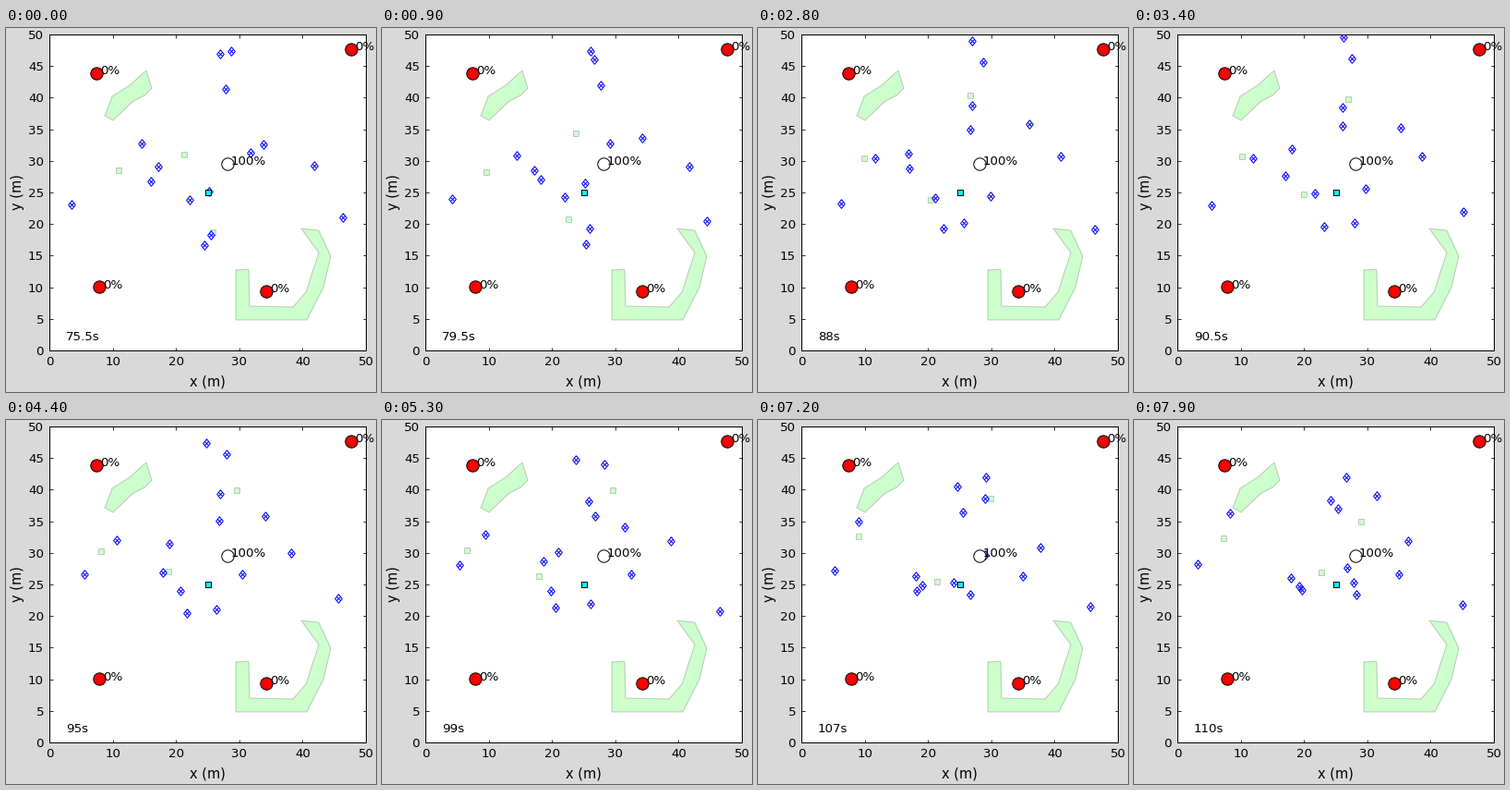
Recreate the animation shown at these times as a matplotlib script. Size 401 by 394 pixels, loop 8 s.

```python
import numpy as np
import matplotlib.pyplot as plt
from matplotlib.animation import FuncAnimation
from matplotlib.lines import Line2D
from matplotlib.patches import Polygon
from matplotlib.path import Path
from matplotlib.transforms import Affine2D

W, H, DPI = 401, 394, 72          # at 72 dpi one point is one pixel
FRAMES, INTERVAL = 80, 100
START, TICK, TICKS = 75.5, 0.5, 69
TEXT, LABEL = 13.33, 14.67

plt.rcParams.update({"font.family": "DejaVu Sans", "font.size": TEXT})
rng = np.random.default_rng(4)


def path(*points):
    """Curve through evenly timed points with a seeded wander, zero at both ends."""
    n = len(points)
    curve = np.polyfit(np.linspace(0, 1, n), points, n - 1)
    waves = np.arange(2, 8)
    sway = rng.normal(0, 3, (len(waves), 2))

    def at(u):
        return u ** np.arange(n)[::-1] @ curve + np.sin(np.pi * waves * u) @ sway

    return at


walkers = [
    path((232, 28), (243, 37), (230, 62)),
    path((244, 25), (219, 24), (213, 87)),
    path((238, 66), (221, 96)),
    path((265, 135), (227, 108), (263, 82)),
    path((279, 126), (285, 105), (231, 160)),
    path((334, 149), (297, 131)),
    path((365, 205), (356, 200)),
    path((220, 177), (287, 167)),
    path((147, 125), (124, 135), (104, 101)),
    path((165, 150), (170, 171)),
    path((157, 166), (173, 136), (238, 176)),
    path((71, 191), (87, 175), (69, 156)),
    path((199, 186), (179, 180)),
    path((222, 224), (241, 189)),
    path((215, 235), (182, 184)),
]
blocks = [
    path((122, 154), (97, 128)),
    path((193, 137), (239, 73), (246, 110)),
    path((224, 221), (178, 172), (203, 165)),
]

fig = plt.figure(figsize=(W / DPI, H / DPI), dpi=DPI, facecolor="#d9d9d9")
ax = fig.add_axes([47 / W, 45 / H, 343 / W, 342 / H])
ax.set(xlim=(0, 50), ylim=(0, 50), xticks=range(0, 51, 10), yticks=range(0, 51, 5))
ax.tick_params(direction="in", top=True, right=True, length=3.5, width=0.8)
ax.tick_params(axis="x", pad=6)
ax.tick_params(axis="y", pad=6)
for spine in ax.spines.values():
    spine.set_linewidth(1)

# Pixel coordinates from the top left corner
px = Affine2D().scale(1, -1).translate(0, H)


def label(x, y, s, **kw):
    return ax.text(x, y, s, transform=px, va="baseline", zorder=8, **kw)


def dots(marker, size, z, xy=((), ()), **kw):
    line = Line2D(*xy, ls="none", marker=marker, ms=size, mew=1,
                  transform=px, zorder=z, **kw)
    ax.add_line(line)
    return line


def zone(*points):
    ax.add_patch(Polygon(points, fc="lime", ec="black", lw=1, alpha=0.2,
                         transform=px, zorder=1))


zone((152, 46), (158, 65), (150, 73), (137, 80), (116, 100), (107, 95),
     (115, 74), (134, 62))
zone((320, 217), (339, 219), (352, 247), (344, 281), (326, 316), (249, 316),
     (249, 262), (263, 261), (264, 301), (311, 302), (325, 286), (339, 243),
     (327, 227))

for x, y, color, share in [(98, 49, "red", 0), (374, 23, "red", 0),
                           (101, 280, "red", 0), (282, 285, "red", 0),
                           (240, 147, "white", 100)]:
    dots("o", 13.33, 5, ([x], [y]), mfc=color, mec="black")
    label(x + 4, y + 1.5, f"{share}%")

dots("s", 6, 6, ([219], [178]), mfc="cyan", mec="black")
label(218, 388, "x (m)", size=LABEL, ha="center")
label(17, 178, "y (m)", size=LABEL, ha="center", rotation=90, rotation_mode="anchor")
timer = label(65, 338, "")

# Tall diamond with a small cross inside
a, b = 0.8, 0.4
crossed = Path([(0, 1), (a, 0), (0, -1), (-a, 0), (0, 1),
                (-b, -b), (b, b), (-b, b), (b, -b)],
               [Path.MOVETO] + [Path.LINETO] * 4 + [Path.MOVETO, Path.LINETO] * 2)
squares = dots("s", 6, 2, mfc="lime", mec="black", alpha=0.2)
diamonds = dots(crossed, 9.6, 4, mfc="none", mec="blue")


def update(i):
    step = np.ceil(i * TICKS / (FRAMES - 1))     # the clock pauses now and then
    u = step / TICKS
    for line, group in ((squares, blocks), (diamonds, walkers)):
        line.set_data(*np.array([at(u) for at in group]).T)
    timer.set_text(f"{START + TICK * step:g}s")
    return squares, diamonds, timer


anim = FuncAnimation(fig, update, frames=FRAMES, interval=INTERVAL,
                     repeat=True, repeat_delay=0)
plt.show()
```
